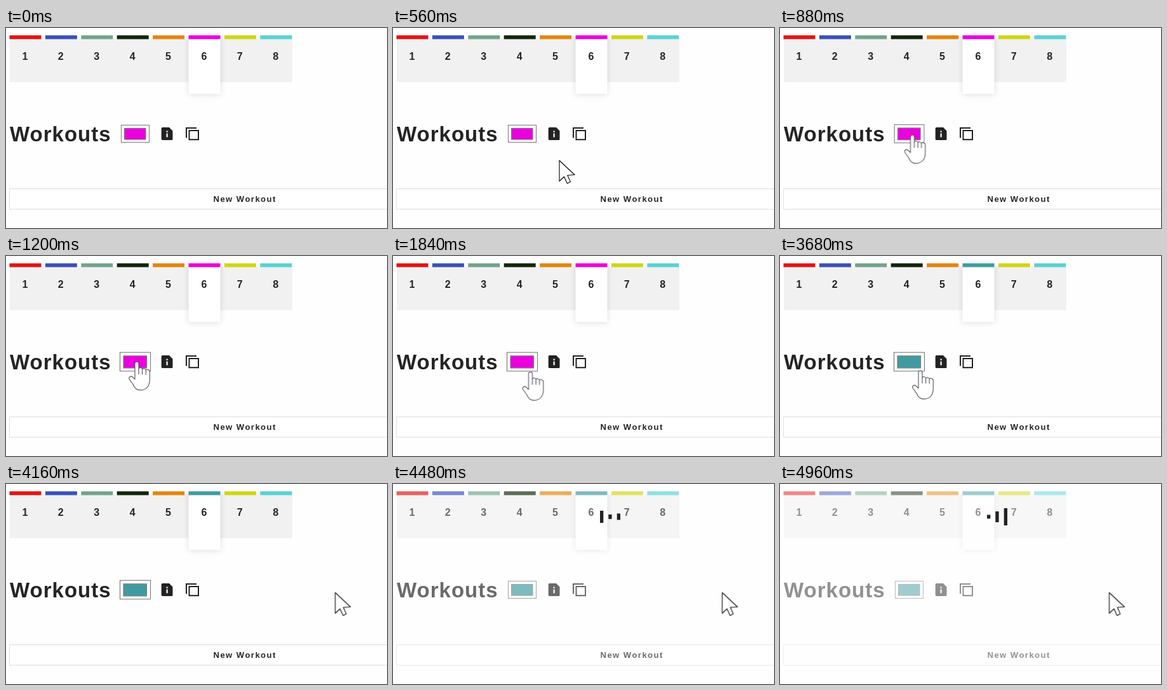
These frames come from a looping animation (600 px wide and 314 px high, 5.04 s). An HTML page:

```html
<!DOCTYPE html>
<html lang="en">
<head>
<meta charset="utf-8">
<title>Workouts</title>
<style>
  html, body { margin: 0; width: 100%; height: 100%; overflow: hidden; background: #fefefe; }
  svg { display: block; width: 100%; height: 100%; }
  text { font-family: "Liberation Sans", Arial, sans-serif; font-weight: bold; fill: #242424; }
  .num { font-size: 16px; text-anchor: middle; }
  .raised { filter: drop-shadow(0 1px 5px rgba(0, 0, 0, .13)); }
  .page, .pick, .swatch, .cursor, .hand, .arrow, .loader { animation: 5040ms step-end infinite; }
  .page { animation-name: dim; }
  .pick { animation-name: recolor; }
  .swatch { animation-name: grow; transform-origin: 203.5px 166px; }
  .cursor { animation-name: move; }
  .hand { animation-name: hand; }
  .arrow { animation-name: arrow; }
  .loader { animation-name: load; fill: #222; }
  .loader rect { transform-origin: 342px 51.5px; animation: pulse 720ms step-end infinite; }

  @keyframes dim {
    0% { opacity: 1; }
    85.714% { opacity: .9; }
    87.301% { opacity: .8; }
    88.888% { opacity: .68; }
    90.476% { opacity: .58; }
    92.063%, 100% { opacity: .5; }
  }
  @keyframes recolor {
    0% { fill: #eb00de; }
    55.555%, 100% { fill: #409ba0; }
  }
  @keyframes grow {
    0% { transform: scale(1); }
    15.873% { transform: scale(1.03); }
    17.46% { transform: scale(1.06); }
    19.047% { transform: scale(1.09); }
    85.714% { transform: scale(1.07); }
    87.301% { transform: scale(1.03); }
    88.888%, 100% { transform: scale(1); }
  }
  @keyframes move {
    0% { transform: translate(285px, 222px); }
    11.111% { transform: translate(262px, 208px); }
    14.285% { transform: translate(232px, 187px); }
    15.873% { transform: translate(214px, 172px); }
    17.46% { transform: translate(208.5px, 168px); }
    19.047% { transform: translate(207.5px, 167.5px); }
    20.634% { transform: translate(207px, 167px); }
    22.222% { transform: translate(206.5px, 166.5px); }
    23.809% { transform: translate(206px, 166px); }
    33.333% { transform: translate(208.5px, 170px); }
    34.92% { transform: translate(213px, 177px); }
    36.507% { transform: translate(216.5px, 182px); }
    73.015% { transform: translate(221px, 180px); }
    74.603% { transform: translate(226px, 178px); }
    79.365% { transform: translate(300px, 175px); }
    80.952% { transform: translate(430px, 172px); }
    82.539%, 100% { transform: translate(518.5px, 170.5px); }
  }
  @keyframes hand {
    0% { opacity: 0; }
    15.873% { opacity: 1; }
    79.365%, 100% { opacity: 0; }
  }
  @keyframes arrow {
    0% { opacity: 0; }
    9.523% { opacity: 1; }
    15.873% { opacity: 0; }
    79.365%, 100% { opacity: 1; }
  }
  @keyframes load {
    0% { opacity: 0; }
    87.301%, 100% { opacity: 1; }
  }
  @keyframes pulse {
    0% { transform: scaleY(1); }
    11.111% { transform: scaleY(.88); }
    22.222% { transform: scaleY(.63); }
    33.333% { transform: scaleY(.38); }
    44.444% { transform: scaleY(.23); }
    55.555% { transform: scaleY(.27); }
    66.666% { transform: scaleY(.46); }
    77.777% { transform: scaleY(.71); }
    88.888%, 100% { transform: scaleY(.93); }
  }
</style>
</head>
<body>
<svg viewBox="0 0 600 314">
  <g class="page">
    <rect x="6" y="17" width="445" height="68" fill="#f1f1f1"/>
    <g id="tabs"></g>

    <text x="6" y="177.5" font-size="33" letter-spacing="1">Workouts</text>

    <g class="swatch" stroke="#777">
      <rect x="181.5" y="152.5" width="44" height="27" fill="#fff"/>
      <rect class="pick" x="186.5" y="157.5" width="33.5" height="17.5"/>
    </g>

    <path d="M246.5 156H257L262.5 161.5V174.5a1.5 1.5 0 0 1-1.5 1.5H246.5a1.8 1.8 0 0 1-1.8-1.8V157.8a1.8 1.8 0 0 1 1.8-1.8z" fill="#222"/>
    <path d="M252.5 161.5h2.2v2.2h-2.2zM252.5 165.5h2.2v6h-2.2z" fill="#fff"/>
    <g fill="none" stroke="#222" stroke-width="2">
      <path d="M284 172.5V157H300"/>
      <rect x="288.5" y="161" width="14.5" height="14.2"/>
    </g>

    <rect x="5.5" y="252.5" width="620" height="32" fill="#fff" stroke="#dedede"/>
    <text x="326.5" y="273" font-size="13" letter-spacing="1.5">New Workout</text>
  </g>

  <g class="loader">
    <rect x="326" y="38" width="5.3" height="27" style="animation-delay: -400ms"/>
    <rect x="339.3" y="38" width="5.3" height="27" style="animation-delay: -240ms"/>
    <rect x="352.7" y="38" width="5.3" height="27" style="animation-delay: -80ms"/>
  </g>

  <g class="cursor" fill="#fff" stroke-linejoin="round">
    <g class="hand" stroke="#50505c" stroke-width="1.1">
      <path d="M-3 27.5V3A3 3 0 0 1 3 3V11C4 8.8 8 9 8.6 12C9.6 9.8 13.6 10.4 14.2 13C15.6 11 20.3 12 20.3 16V28C20.3 38 15 44.5 6 44.5C-2 44.5-4 39.5-6 35.5L-11.5 28C-14 24.5-9.5 21.5-7 23.8Z"/>
      <path d="M3 11V20M8.6 12V20M14.2 13V20.5" fill="none"/>
    </g>
    <path class="arrow" stroke="#000" stroke-width="1.1" d="M0 0V32.5L7.5 25.5L12.3 36L17.4 33.6L12.8 23.3L24 22.5Z"/>
  </g>
</svg>
<script>
  const colors = ['#e51212', '#3a50b8', '#70a58b', '#11260a', '#e4850f', '', '#cfd714', '#58d2d3'];
  const pitch = 56.4;

  function tab(color, i) {
    const x = 5.5 + i * pitch;
    const active = !color;
    const card = active ? `<rect class="raised" x="${x}" y="11.5" width="50" height="92" fill="#fff"/>` : '';
    const bar = `<rect ${active ? 'class="pick"' : `fill="${color}"`} x="${x}" y="11.5" width="50" height="6"/>`;
    return `${card}${bar}<text class="num" x="${x + 24.4}" y="50">${i + 1}</text>`;
  }

  document.getElementById('tabs').innerHTML = colors.map(tab).join('');
</script>
</body>
</html>
```
